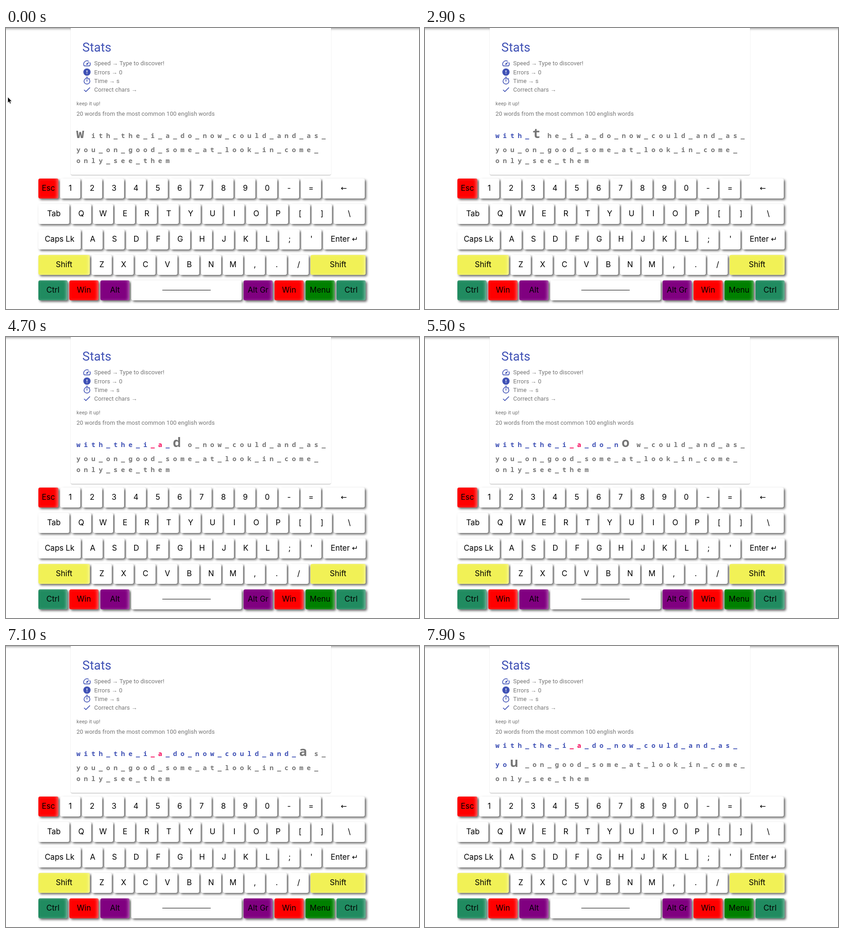
An HTML page that plays this animation: 906x618 px, repeating every 8000 ms.

```html
<!DOCTYPE html>
<html lang="en">
<head>
<meta charset="utf-8">
<title>Typing practice</title>
<style>
  html, body { margin: 0; width: 100%; height: 100%; overflow: hidden; background: #fff; }
  body { position: relative; }
  body > * { position: absolute; box-sizing: border-box; }
  #bar {
    left: -10px; right: -10px; top: -20px; height: 20px;
    box-shadow: 0 1.6px 3.2px -.8px rgba(0,0,0,.2), 0 3.2px 4px rgba(0,0,0,.14), 0 .8px 8px rgba(0,0,0,.12);
  }
  #card {
    top: -10px; height: 333px; background: #fff; border-radius: 3.2px;
    box-shadow: 0 1.6px .8px -.8px rgba(0,0,0,.2), 0 .8px .8px rgba(0,0,0,.14), 0 .8px 2.4px rgba(0,0,0,.12);
  }
  svg { left: 0; top: 0; }
  text { font: 12.8px Roboto, 'Liberation Sans', sans-serif; letter-spacing: .12px; fill: #757575; }
  .arrow { font-family: 'Liberation Sans', sans-serif; }
  #title { font-size: 27.2px; letter-spacing: .2px; fill: #3f51b5; }
  #cheer { font-size: 11.2px; }
  #words { font: bold 14.5px 'Noto Sans Mono', monospace; letter-spacing: 0; text-anchor: middle; }
  .now { font-size: 29px; }
  .ok { fill: #3f51b5; }
  .bad { fill: #f50057; }
  .line { fill: none; stroke: #3f51b5; stroke-width: 2; }
  .key {
    height: 44px; border-radius: 4px; color: #000; text-align: center;
    font: 17px/43px Inter, sans-serif; white-space: pre;
    box-shadow: 3px 3px 5px rgba(0,0,0,.6), inset -4px 0 6px -1px rgba(255,255,255,.4);
  }
  .key span { font: 16px 'DejaVu Sans', sans-serif; }
  .key i { display: block; width: 106px; height: 1.5px; margin: 20.5px auto; background: #000; }
</style>
</head>
<body>
<div id="bar"></div>
<div id="card"></div>
<svg width="906" height="618">
  <g id="content">
    <text id="title" x="167.6" y="51.5">Stats</text>
    <g transform="translate(168 68.2) scale(.8)" fill="#3f51b5">
      <path d="M20.38 8.57l-1.23 1.85a8 8 0 0 1-.22 7.58H5.07A8 8 0 0 1 15.58 6.85l1.85-1.23A10 10 0 0 0 3.35 19a2 2 0 0 0 1.72 1h13.85a2 2 0 0 0 1.74-1 10 10 0 0 0-.27-10.44zm-9.79 6.84a2 2 0 0 0 2.83 0l5.66-8.49-8.49 5.66a2 2 0 0 0 0 2.83z"/>
      <g transform="translate(0 24)">
        <circle cx="12" cy="12" r="10"/>
        <path d="M12 7v6M12 15v2" stroke="#fff" stroke-width="2"/>
      </g>
      <g transform="translate(0 48)" class="line">
        <circle cx="12" cy="13" r="8"/>
        <path d="M9 2h6M12 8v6M17.6 7.4l2.1-2.1"/>
      </g>
      <path transform="translate(0 72)" class="line" d="M4.1 12.7L9 17.6 20.3 6.3"/>
    </g>
    <text x="193.6" y="82.4">Speed <tspan class="arrow">→</tspan> Type to discover!</text>
    <text x="193.6" y="101.6">Errors <tspan class="arrow">→</tspan> 0</text>
    <text x="193.6" y="120.8">Time <tspan class="arrow">→</tspan> s</text>
    <text x="193.6" y="140">Correct chars <tspan class="arrow">→</tspan></text>
    <text id="cheer" x="154.8" y="170.4">keep it up!</text>
    <text x="154.8" y="192.6">20 words from the most common 100 english words</text>
    <text id="words"></text>
  </g>
  <path id="pointer" d="M4 152v12.5l2.8-2.6 2 4.6 2-.9-2-4.4h3.9z" stroke="#fff" stroke-width=".6"/>
</svg>
<script>
const $ = id => document.getElementById(id);

// Keyboard: "label:width:colour", default width 44 and white
const rows = [
  'Esc:44:red 1 2 3 4 5 6 7 8 9 0 - = <span>←</span>:92',
  "Tab:68 Q W E R T Y U I O P [ ] \\:68",
  "Caps_Lk:93 A S D F G H J K L ; ' Enter_<span>↵</span>:92.5",
  'Shift:113:#f1f156 Z X C V B N M , . / Shift:121:#f1f156',
  'Ctrl:64:#208b60 Win:64:red Alt:64:purple <i></i>:242 Alt_Gr:64:purple Win:64:red Menu:64:green Ctrl:64:#208b60'
];
rows.forEach((row, r) => {
  let x = 71;
  for (const spec of row.split(' ')) {
    const [label, width = 44, colour = '#fff'] = spec.split(':');
    const key = document.createElement('div');
    key.className = 'key';
    key.innerHTML = label.replace('_', ' ');
    key.style.cssText = `left:${x}px;top:${331 + r * 56}px;width:${width}px;background:${colour}`;
    document.body.append(key);
    x += +width + 4;
  }
});

const lines = [
  'with_the_i_a_do_now_could_and_as_',
  'you_on_good_some_at_look_in_come_',
  'only_see_them'
];
const step = 16.3, perLine = 33;
// Moment at which each character becomes the current one
const starts = [
  0, 2300, 2900, 2900, 2900, 2900, 3200, 3300, 3400, 3500, 3700, 4000,
  4200, 4700, 5000, 5100, 5300, 5500, 5600, 5600, 5800, 6000, 6100, 6100,
  6300, 6400, 6500, 6600, 6800, 7000, 7100, 7200, 7400, 7500, 7700, 7900
];
const wrong = [10, 11];

function drawWords(current) {
  const activeLine = Math.floor(current / perLine);
  const baselines = activeLine ? [224.4, 266.4, 296.6] : [242.4, 272.6, 296.6];
  let out = '';
  lines.forEach((line, l) => [...line].forEach((char, c) => {
    const i = l * perLine + c;
    const slot = c + (l === activeLine && i > current ? 1 : 0);
    const x = 154.8 + slot * step + (i === current ? 8 : 4.1);
    const kind = i === current ? 'now' : i > current ? '' : wrong.includes(i) ? 'bad' : 'ok';
    out += `<tspan x="${x.toFixed(2)}" y="${baselines[l]}" class="${kind}">${char}</tspan>`;
  }));
  $('words').innerHTML = out;

  // The card shrinks while the enlarged character ends the first line
  const inset = current === perLine - 1 ? 4.1 : 0;
  $('card').style.left = 142.2 + inset + 'px';
  $('card').style.width = 571 - 2 * inset + 'px';
  $('content').setAttribute('transform', `translate(${inset})`);
}

let shown = -1;
function tick() {
  const t = performance.now() % 8000;
  const current = starts.filter(s => s <= t).length - 1;
  if (current !== shown) drawWords(shown = current);
  $('pointer').style.display = t < 1400 ? '' : 'none';
  requestAnimationFrame(tick);
}
tick();
</script>
</body>
</html>
```
